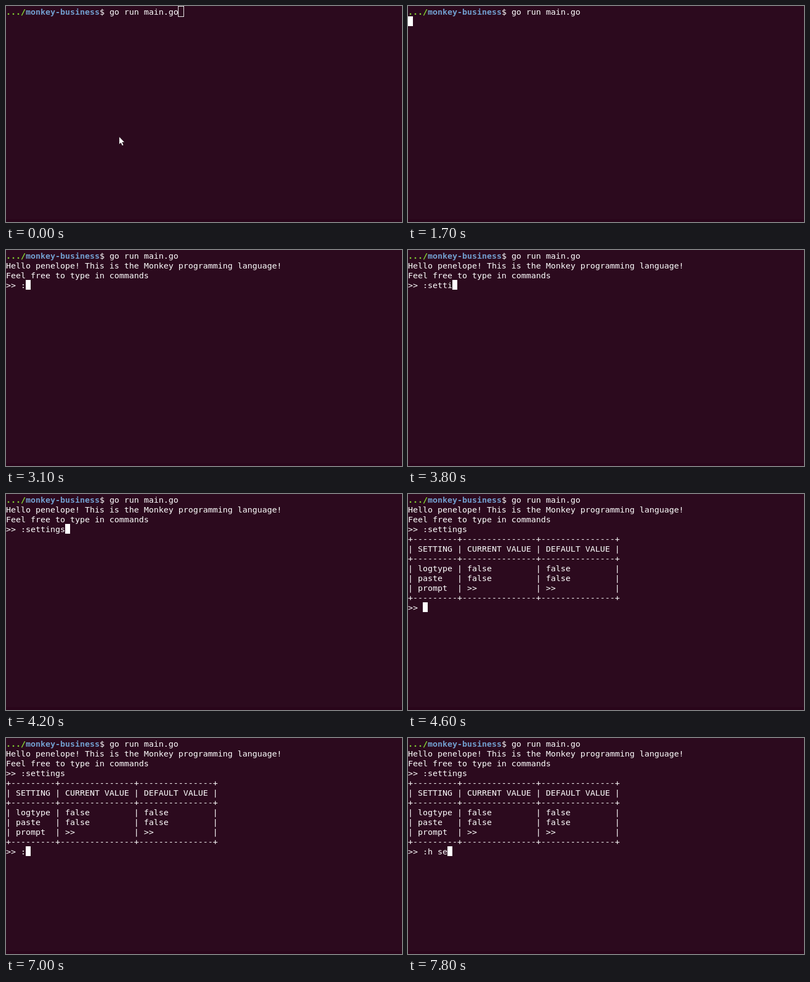
An HTML page that plays this animation: 723x397 px, repeating every 8000 ms.

```html
<!DOCTYPE html>
<html lang="en">
<head>
<meta charset="utf-8">
<title>Terminal session</title>
<style>
  html, body { margin: 0; width: 100%; height: 100%; overflow: hidden; background: #2c0a1e; }
  svg { display: block; }
  text {
    font: 14.95px "DejaVu Sans Mono", "Liberation Mono", monospace;
    fill: #fff;
    white-space: pre;
  }
  .bold { font-weight: bold; }
  .dir { fill: #8ae234; }
  .name { fill: #729fcf; }
</style>
</head>
<body>
<svg width="723" height="397" viewBox="0 0 723 397">
  <rect width="723" height="397" fill="#2c0a1e"/>
  <rect y="392" width="723" height="5" fill="#29051a"/>
  <text y="16"><tspan class="bold dir">.../</tspan><tspan class="bold name">monkey-business</tspan>$ go run main.go</text>
  <g id="lines"></g>
  <rect id="block" width="9" height="18" fill="#fff"/>
  <rect id="hollow" x="314.5" y="0.5" width="10" height="19" fill="none" stroke="#fff"/>
  <path id="arrow" d="M206.5 240v14.5l3.2-3 2.3 5.3 2.6-1.1-2.3-5.1h4.4z" fill="#fff" stroke="#1a0612" stroke-width=".7"/>
  <path id="beam" d="M207 232.5h2.5l1 1 1-1h2.5M210.5 233.5v13M207 247.5h2.5l1-1 1 1h2.5" fill="none" stroke="#fff"/>
</svg>
<script>
const LOOP = 8000, COL = 9, ROW = 18, TOP = 1, BASELINE = 15;
const $ = id => document.getElementById(id);

const rule = "+" + [9, 15, 15].map(n => "-".repeat(n)).join("+") + "+";
const row = (a, b, c) => `| ${a.padEnd(7)} | ${b.padEnd(13)} | ${c.padEnd(13)} |`;
const greeting = ["Hello penelope! This is the Monkey programming language!", "Feel free to type in commands"];
const table = [
  rule, row("SETTING", "CURRENT VALUE", "DEFAULT VALUE"), rule,
  row("logtype", "false", "false"), row("paste", "false", "false"), row("prompt", ">>", ">>"), rule
];

// Each entry is [time, characters typed so far].
const firstKeys = [[3100, 1], [3300, 3], [3600, 4], [3700, 5], [3800, 6], [4000, 7], [4100, 8], [4200, 9]];
const secondKeys = [[7000, 1], [7500, 3], [7600, 4], [7800, 5]];
const cursorOff = [[0, 600], [1500, 1700], [2300, 2700], [5100, 5700], [6300, 6500], [7200, 7500]];

const within = (t, from, to) => t >= from && t < to;
const typed = (word, keys, t) => word.slice(0, keys.reduce((n, [at, count]) => t >= at ? count : n, 0));
const show = (id, on) => $(id).setAttribute("visibility", on ? "visible" : "hidden");

const rows = Array.from({ length: 11 }, (_, i) => {
  const el = document.createElementNS("http://www.w3.org/2000/svg", "text");
  el.setAttribute("y", TOP + (i + 1) * ROW + BASELINE);
  return $("lines").appendChild(el);
});

function screenLines(t) {
  if (t < 2300) return [];
  const lines = [...greeting, ">> " + typed(":settings", firstKeys, t)];
  if (t >= 4600) lines.push(...table, ">> " + typed(":h se", secondKeys, t));
  return lines;
}

function cursorCell(t, lines) {
  if (t < 1700) return [35, 0];
  if (!lines.length) return [0, 1];
  return [lines[lines.length - 1].length, lines.length];
}

function draw(t) {
  const lines = screenLines(t);
  rows.forEach((el, i) => {
    const line = lines[i] || "";
    if (el.textContent !== line) el.textContent = line;
  });
  const [col, line] = cursorCell(t, lines);
  $("block").setAttribute("x", col * COL);
  $("block").setAttribute("y", TOP + line * ROW);
  show("block", !cursorOff.some(([from, to]) => within(t, from, to)));
  show("hollow", t < 600);
  show("arrow", t < 500);
  show("beam", within(t, 500, 1600));
}

const start = performance.now();
function tick() {
  draw((performance.now() - start) % LOOP);
  requestAnimationFrame(tick);
}
tick();
</script>
</body>
</html>
```
